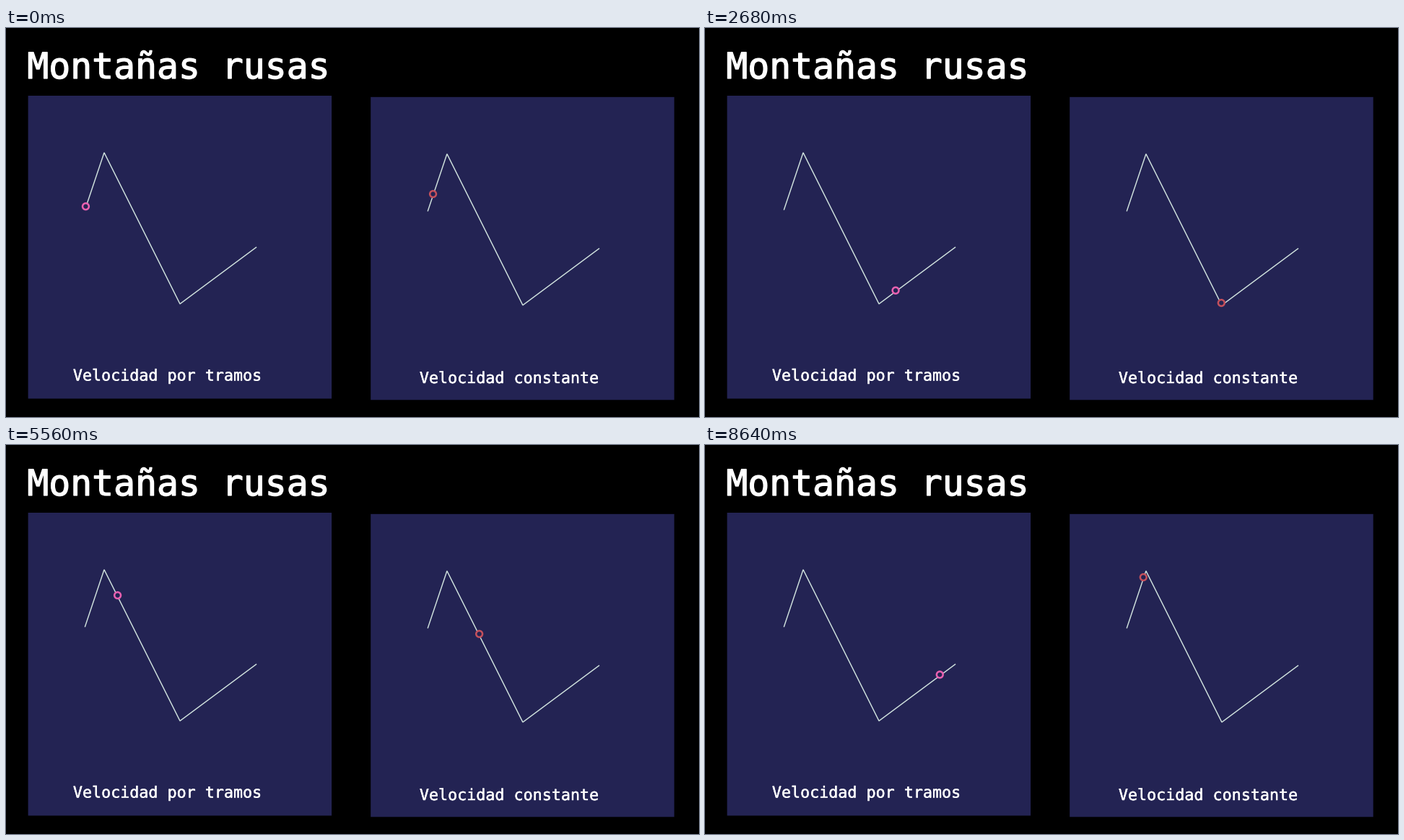
A matplotlib script that plays this animation: 960x540 px, repeating every 8.96 s.

```python
import numpy as np
import matplotlib.pyplot as plt
from matplotlib.animation import FuncAnimation
from matplotlib.patches import Circle, Rectangle
from matplotlib.patheffects import withStroke

W, H, DPI = 960, 540, 100
PT = 72 / DPI              # points per pixel
STEP = 40                  # ms per frame
FRAMES, LAST = 224, 216    # the final pose is held until the loop ends

PANEL = "#232353"
TRACK = "#d0e2de"
KNOTS = np.array([(109.5, 252), (136, 173), (241, 383), (346.5, 304.5)])
SHIFT = np.array([474.9, 1.8])   # left track to right track

LEG_TIMES = np.array([0.761, 1.423, 2.39])   # seconds spent on each leg
LEAD = 0.027
SPEED, START = 109.8, 22.5                   # px per second, px along the track

fig = plt.figure(figsize=(W / DPI, H / DPI), dpi=DPI, facecolor="black")
ax = fig.add_axes([0, 0, 1, 1])
ax.set_xlim(0, W)
ax.set_ylim(H, 0)
ax.axis("off")


def label(x, y, text, size, weight):
    t = ax.text(x, y, text, color="white", family="DejaVu Sans Mono",
                fontsize=size * PT, va="baseline")
    t.set_path_effects([withStroke(linewidth=weight * PT, foreground="white")])


def panel(x, y, knots, color):
    """Draw a square with its track and return the marker that rides on it."""
    ax.add_patch(Rectangle((x, y), 420.5, 420.5, fc=PANEL, lw=0, snap=False))
    ax.plot(*knots.T, color=TRACK, lw=1.45 * PT, solid_joinstyle="miter")
    ring = Circle(knots[0], 4.4, fc=PANEL, ec=color, lw=2.5 * PT, zorder=3)
    return ax.add_patch(ring)


def along(knots, stops, s):
    """Point on the polyline at s, where stops are the values at the knots."""
    s = s % stops[-1]
    return np.array([np.interp(s, stops, axis) for axis in knots.T])


def cumulative(parts):
    return np.concatenate(([0], np.cumsum(parts)))


right_knots = KNOTS + SHIFT
times = cumulative(LEG_TIMES)
lengths = cumulative(np.hypot(*np.diff(right_knots, axis=0).T))

label(29.3, 70, "Montañas rusas", 49.75, 1.3)
left = panel(30.6, 94, KNOTS, "#e960b0")
right = panel(505.2, 95.8, right_knots, "#c4505c")
label(92.9, 489.5, "Velocidad por tramos", 21.7, 0.4)
label(572.9, 493, "Velocidad constante", 21.7, 0.4)


def update(i):
    t = min(i, LAST) * STEP / 1000
    left.center = along(KNOTS, times, t + LEAD) - (0, 1.5)
    right.center = along(right_knots, lengths, START + SPEED * t) - (0, 2)
    return left, right


anim = FuncAnimation(fig, update, frames=FRAMES, interval=STEP,
                     repeat=True, repeat_delay=0, blit=False)
plt.show()
```
